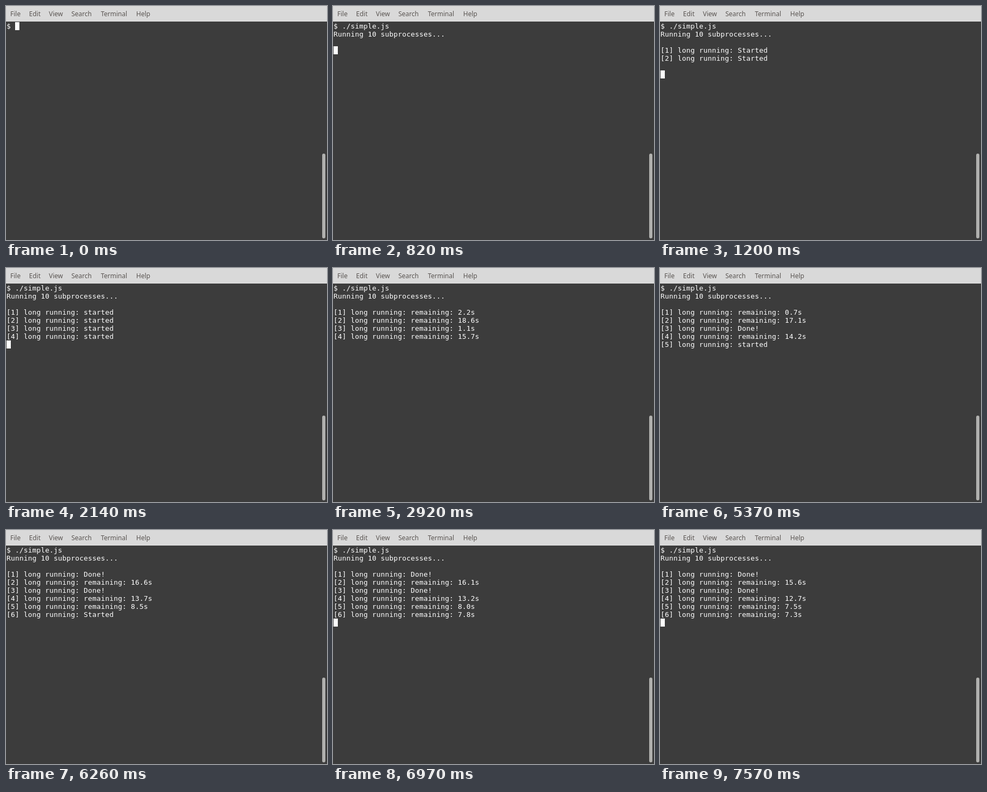
Animation, 599 px wide and 436 px high, one loop 8 s. Source, as an HTML page:

```html
<!DOCTYPE html>
<html lang="en">
<head>
<meta charset="utf-8">
<title>Terminal</title>
<style>
  html, body { margin: 0; width: 100%; height: 100%; overflow: hidden; background: #3c3c3c; }
  body { position: relative; }
  .menu { height: 29px; background: #d9d9d9; font: 12px/17px "Noto Sans", "Open Sans", sans-serif; color: #5a5552; }
  .menu span { position: absolute; top: 6px; }
  /* every character fills one 8px terminal cell */
  #screen {
    position: absolute; left: 1px; top: 30px; margin: 0; color: #fff;
    font: 13px/15px "DejaVu Sans Mono", monospace; letter-spacing: calc(8px - 1ch);
    font-variant-ligatures: none;
  }
  #cursor { position: absolute; width: 8px; height: 15px; background: #fff; }
  .scrollbar { position: absolute; left: 590px; top: 275px; width: 6px; height: 158px; border-radius: 3px; background: #b0b0ae; }
</style>
</head>
<body>
<div class="menu">
  <span style="left:8px">File</span>
  <span style="left:43px">Edit</span>
  <span style="left:80px">View</span>
  <span style="left:122px">Search</span>
  <span style="left:177px">Terminal</span>
  <span style="left:243px">Help</span>
</div>
<pre id="screen"></pre>
<div id="cursor"></div>
<div class="scrollbar"></div>
<script>
const LOOP = 8000, CELL = 8, ROW = 15, LEFT = 1, TOP = 30;
const TYPED = 340, ENTERED = 750, LISTED = 820;
const FIRST_JOB_ROW = 3, LINE_LEAD = 100, WARM_UP = 430, FIRST_COUNT = 500, STEP = 0.5;

// Every running job counts down once per round, `lag` ms after the round begins.
const rounds = [2140, 2920, 3700, 4480, 5370, 6060, 6840, 7420];
const jobs = [
  { start: 1000, from: 2.2, lag: 100 },
  { start: 1100, from: 18.6, lag: 220 },
  { start: 1300, from: 1.1, lag: 260 },
  { start: 1400, from: 15.7, lag: 300 },
  { start: 4940, from: 8.5, lag: 0 },
  { start: 6260, from: 7.8, lag: 0 }
];
const cursorOff = [[2920, 3700], [5370, 6840], [7420, 7570]];

const screen = document.getElementById("screen");
const cursor = document.getElementById("cursor");

function status({ start, from, lag }, time) {
  const counts = rounds.filter(round => round > start + FIRST_COUNT && round + lag <= time).length;
  if (!counts) return time < start + WARM_UP ? "Started" : "started";
  const remaining = from - STEP * (counts - 1);
  return remaining < 0 ? "Done!" : `remaining: ${remaining.toFixed(1)}s`;
}

function screenText(time) {
  if (time < TYPED) return "$ ";
  const lines = ["$ ./simple.js"];
  if (time >= LISTED) lines.push("Running 10 subprocesses...", "");
  jobs.forEach((job, i) => {
    if (time >= job.start) lines.push(`[${i + 1}] long running: ${status(job, time)}`);
  });
  return lines.join("\n");
}

function cursorCell(time) {
  if (time < TYPED) return [0, 2];
  if (time < ENTERED) return [0, 13];
  if (time < LISTED) return [1, 0];
  // the next line is opened shortly before its job reports
  return [FIRST_JOB_ROW + jobs.filter(job => job.start <= time + LINE_LEAD).length, 0];
}

function render(time) {
  const text = screenText(time);
  if (screen.textContent !== text) screen.textContent = text;

  const [row, column] = cursorCell(time);
  const hidden = cursorOff.some(([from, to]) => time >= from && time < to);
  cursor.style.left = `${LEFT + column * CELL}px`;
  cursor.style.top = `${TOP + row * ROW}px`;
  cursor.style.visibility = hidden ? "hidden" : "visible";
}

const begin = performance.now();
function frame() {
  render((performance.now() - begin) % LOOP);
  requestAnimationFrame(frame);
}
frame();
</script>
</body>
</html>
```
